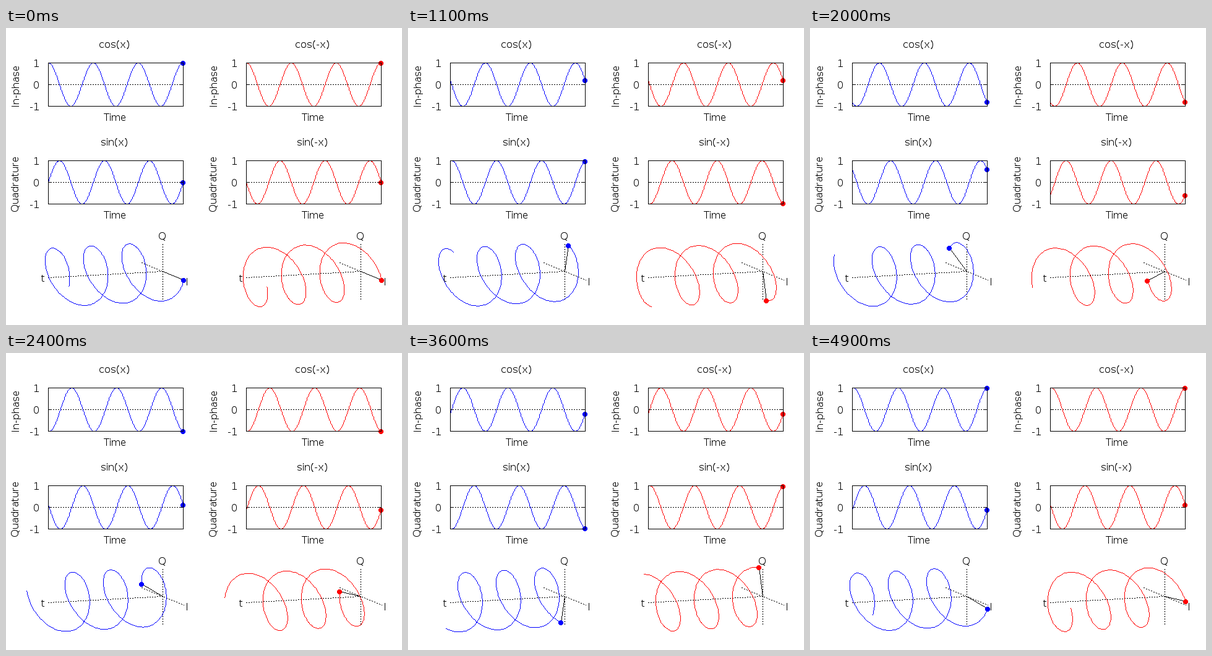
Recreate the animation shown at these times as a matplotlib script. Size 640 px wide and 480 px high, loop 5000 ms.

```python
import numpy as np
import matplotlib.pyplot as plt
from matplotlib.animation import FuncAnimation

FRAMES = 50
TURNS = 3
PT = 0.72  # points per pixel at 100 dpi

plt.rcParams.update({"font.family": "DejaVu Sans", "font.size": 16 * PT,
                     "text.hinting": "default", "text.hinting_factor": 1})

fig = plt.figure(figsize=(6.4, 4.8), dpi=100, facecolor="white")
ax = fig.add_axes([0, 0, 1, 1])
ax.set_xlim(0, 640)
ax.set_ylim(480, 0)
ax.axis("off")

LEFT, RIGHT, AMP = 68, 286, 35
ORIGIN = np.array([253, 394])
I_AXIS = np.array([34, 14])
Q_AXIS = np.array([0, -45])
T_AXIS = np.array([-186, 10.5])

u = np.linspace(0, 1, 300)

grid_x, grid_y = np.meshgrid(np.arange(-4, 4), np.arange(-4, 4))
inside = (grid_x + 0.5) ** 2 + (grid_y + 0.5) ** 2 < 17
DISC_X, DISC_Y = grid_x[inside], grid_y[inside] + 1


def pixels(color="black", zorder=2):
    """An empty set of hard one-pixel dots."""
    return ax.plot([], [], ",", color=color, zorder=zorder)[0]


def plot_pixels(artist, x, y):
    # Stay clear of pixel edges so that snapping is unambiguous.
    artist.set_data(x + 0.25, y + 0.25)


def trace(xs, ys):
    """Whole pixels along a polyline, one per step of the longer axis."""
    xs, ys = np.rint(xs), np.rint(ys)
    dx, dy = np.diff(xs), np.diff(ys)
    steps = np.maximum(abs(dx), abs(dy)).astype(int)
    seg = np.repeat(np.arange(len(steps)), steps)
    along = np.arange(len(seg)) - (np.cumsum(steps) - steps)[seg]
    frac = along / steps[seg]
    x = np.append(xs[seg] + dx[seg] * frac, xs[-1])
    y = np.append(ys[seg] + dy[seg] * frac, ys[-1])
    return np.rint(x), np.rint(y)


def line(xs, ys, zorder=2):
    plot_pixels(pixels(zorder=zorder), *trace(xs, ys))


def dotted(start, end):
    x, y = trace(*zip(start, end))
    on = np.arange(len(x)) % 4 < 2
    plot_pixels(pixels(zorder=1), x[on], y[on])


def label(x, baseline, text, ha="center", rotation=0):
    ax.text(x, baseline, text, ha=ha, va="baseline",
            rotation=rotation, rotation_mode="anchor")


def place(disc, x, y):
    plot_pixels(disc, np.rint(x) + DISC_X, np.rint(y) + DISC_Y)


class Wave:
    """Framed time plot whose newest value sits at the right edge."""

    def __init__(self, dx, mid, title, name, color, func):
        self.left, self.right, self.mid = LEFT + dx, RIGHT + dx, mid
        self.func = func
        left, right = self.left, self.right
        top, bottom = mid - AMP, mid + AMP
        label(dx + 175, mid - 60, title)
        label(dx + 176, mid + 58, "Time")
        label(dx + 20, mid + 0.5, name, rotation=90)
        for value in (-1, 0, 1):
            label(dx + 54, mid - AMP * value + 6, str(value), ha="right")
        dotted((left, mid), (right, mid))
        line([left, right, right, left, left],
             [top, top, bottom, bottom, top], zorder=5)
        line([left, left + 4], [mid, mid], zorder=5)
        line([right - 4, right], [mid, mid], zorder=5)
        self.curve = pixels(color)
        self.disc = pixels(color, zorder=4)

    def update(self, phase):
        y = self.mid - AMP * self.func(phase + 2 * np.pi * TURNS * (u - 1))
        x = self.left + (self.right - self.left) * u
        plot_pixels(self.curve, *trace(x, y))
        place(self.disc, x[-1], y[-1])


class Helix:
    """Phasor trailing a spiral back along the time axis."""

    def __init__(self, dx, color, sign):
        self.origin, self.sign = ORIGIN + [dx, 0], sign
        dotted(self.origin - I_AXIS, self.origin + I_AXIS)
        dotted(self.origin - Q_AXIS, self.origin + Q_AXIS)
        dotted(self.origin, self.origin + T_AXIS)
        label(dx + 252.5, 342, "Q")
        label(dx + 293, 416, "I")
        label(dx + 60, 410, "t")
        self.curve = pixels(color)
        self.arm = pixels(zorder=3)
        self.disc = pixels(color, zorder=4)

    def update(self, phase):
        angle = self.sign * (phase - 2 * np.pi * TURNS * u)
        x, y = (self.origin[:, None] + np.outer(I_AXIS, np.cos(angle))
                + np.outer(Q_AXIS, np.sin(angle)) + np.outer(T_AXIS, u))
        plot_pixels(self.curve, *trace(x, y))
        plot_pixels(self.arm, *trace([self.origin[0], x[0]],
                                     [self.origin[1], y[0]]))
        place(self.disc, x[0], y[0])


parts = []
for dx, color, sign, arg in ((0, "#0000ff", 1, "x"),
                             (320, "#ff0000", -1, "-x")):
    parts += [
        Wave(dx, 92, f"cos({arg})", "In-phase", color, np.cos),
        Wave(dx, 250, f"sin({arg})", "Quadrature", color,
             lambda a, s=sign: np.sin(s * a)),
        Helix(dx, color, sign),
    ]


def update(frame):
    for part in parts:
        part.update(2 * np.pi * frame / FRAMES)
    return []


anim = FuncAnimation(fig, update, frames=FRAMES, interval=100,
                     repeat=True, repeat_delay=0, blit=False)
plt.show()
```
